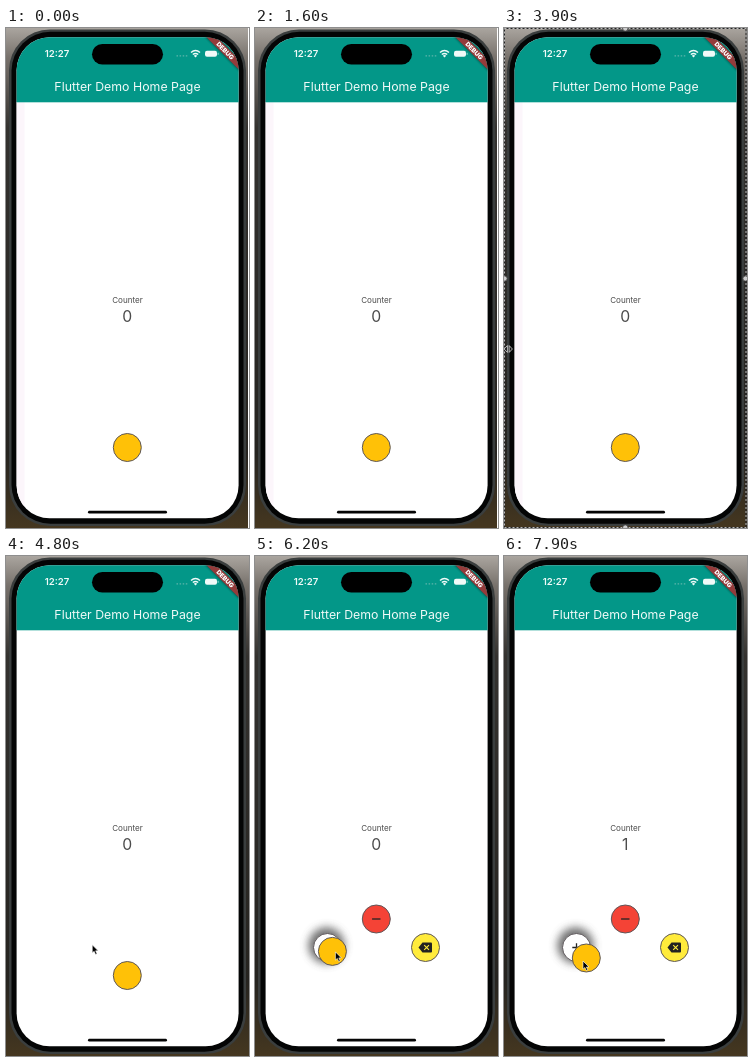
Animation, 243 px wide and 500 px high, one loop 8000 ms. Source, as an HTML page:

```html
<!DOCTYPE html>
<html lang="en">
<head>
<meta charset="utf-8">
<title>Counter demo</title>
<style>
  html, body { margin: 0; width: 100%; height: 100%; overflow: hidden; background: #2b2721; }
  svg { display: block; width: 243px; height: 500px; font-family: Inter, Roboto, sans-serif; }
  .btn circle { stroke: #5d575a; stroke-width: 1; }
  .icon { fill: none; stroke: #222; stroke-width: 1.3; }
</style>
</head>
<body>
<svg viewBox="0 0 243 500">
  <defs>
    <linearGradient id="wall" x2="0" y2="1">
      <stop offset="0" stop-color="#aaa59f"/>
      <stop offset=".06" stop-color="#77716b"/>
      <stop offset=".2" stop-color="#34322f"/>
      <stop offset=".85" stop-color="#262420"/>
      <stop offset="1" stop-color="#453720"/>
    </linearGradient>
    <clipPath id="screen"><rect x="10.6" y="9.3" width="222" height="481" rx="33"/></clipPath>
    <filter id="blur" x="-50%" y="-50%" width="200%" height="200%"><feGaussianBlur stdDeviation="4"/></filter>
    <filter id="soft" x="-20%" y="-100%" width="140%" height="300%"><feGaussianBlur stdDeviation="1.2"/></filter>
  </defs>

  <rect width="243" height="500" fill="url(#wall)"/>
  <rect x="3" y="1.5" width="237" height="496.5" rx="41" fill="#3a3e3e"/>
  <rect x="5.5" y="3.8" width="232" height="492" rx="39" fill="#040505"/>

  <g clip-path="url(#screen)">
    <rect x="10" y="9" width="223" height="483" fill="#fff"/>
    <rect id="tint" x="10" y="74" width="8.5" height="418" fill="#fcf6fb"/>
    <rect x="10" y="9" width="223" height="65.3" fill="#039788"/>
    <g transform="translate(219.2 22.8) rotate(45)">
      <rect x="-40" y="-4" width="80" height="8" fill="#000" opacity=".5" filter="url(#soft)"/>
      <rect x="-40" y="-3.7" width="80" height="7.4" fill="#943b3b"/>
      <text y="2.2" font-size="6.3" font-weight="900" text-anchor="middle" fill="#fff">DEBUG</text>
    </g>
  </g>

  <rect x="86" y="16" width="71" height="20.6" rx="10.3" fill="#000"/>
  <g fill="#f0faf8">
    <text x="51" y="29.3" font-size="9.6" font-weight="600" text-anchor="middle">12:27</text>
    <path d="M170.5 27.8h11" stroke="#5fb5ab" stroke-width="1.3" stroke-dasharray="1.5 1.6"/>
    <path d="M185 24.6Q189.5 20.4 194 24.6M186.8 26.6Q189.5 24.2 192.2 26.6" fill="none" stroke="#f0faf8" stroke-width="1.4"/>
    <path d="M187.8 27.7Q189.5 26.4 191.2 27.7L189.5 29.6z"/>
    <rect x="199" y="22.8" width="12" height="6" rx="2"/>
    <rect x="211.6" y="24.8" width="1" height="2" opacity=".6"/>
    <text x="121.5" y="63" font-size="12.35" text-anchor="middle">Flutter Demo Home Page</text>
  </g>

  <g text-anchor="middle" fill="#4c4c4c">
    <text x="121.5" y="275" font-size="8.1">Counter</text>
    <text id="count" x="121.3" y="294.3" font-size="15.75">0</text>
  </g>
  <rect x="82" y="482.8" width="79" height="2.8" rx="1.4" fill="#050505"/>

  <g id="options">
    <circle id="glow" cx="71.5" cy="389.5" r="18" fill="#555" opacity=".85" filter="url(#blur)"/>
    <g class="btn" transform="translate(121.3 363)">
      <circle r="14" fill="#f44336"/>
      <path class="icon" d="M-4.2 0h8.4"/>
    </g>
    <g class="btn" transform="translate(72.5 391.5)">
      <circle r="14" fill="#fff"/>
      <path class="icon" d="M-4.2 0h8.4M0-4.2v8.4"/>
    </g>
    <g class="btn" transform="translate(170.5 391.5)">
      <circle r="14" fill="#ffeb3b"/>
      <path d="M-7 0L-3-5H5.5Q6.5-5 6.5-4V4Q6.5 5 5.5 5H-3z" fill="#222"/>
      <path d="M-1.3-2.4l4.8 4.8M3.5-2.4l-4.8 4.8" stroke="#ffeb3b" stroke-width="1.1"/>
    </g>
  </g>
  <g id="ball" class="btn"><circle r="14" fill="#ffc107"/></g>

  <path id="arrow" d="M0 0V8.2L1.9 6.5L3.3 9.6L4.8 8.9L3.4 6H6z" fill="#000" stroke="#fff" stroke-width=".6"/>

  <path id="edge" d="M242.5 0v500" stroke="#fff"/>
  <g id="selection">
    <rect x=".5" y=".5" width="241.5" height="499" fill="none" stroke="#222"/>
    <rect x=".5" y=".5" width="241.5" height="499" fill="none" stroke="#bbb" stroke-dasharray="2 2"/>
    <g fill="#ccc" stroke="#444" stroke-width=".8">
      <circle cx="121.3" cy=".5" r="2.6"/>
      <circle cx="121.3" cy="499.5" r="2.6"/>
      <circle cx=".5" cy="250.5" r="2.6"/>
      <circle cx="241.5" cy="250.5" r="2.6"/>
    </g>
    <path d="M.2 321l3.2-3.4v6.8zM8.4 321l-3.2-3.4v6.8z" fill="#111" stroke="#ddd" stroke-width=".8"/>
  </g>
</svg>
<script>
  const LOOP = 8000;
  const HOME = [121.3, 419.5];
  const $ = id => document.getElementById(id);

  // Each key is [time, x, y].
  const pointer = [
    [4300, 4, 321], [5100, 124, 420], [5700, 124, 420], [6300, 77, 394],
    [6700, 77, 394], [6900, 81, 394], [7250, 118, 422.5], [7450, 118, 422.5], [7900, 79, 405], [8000, 77, 401]
  ];
  const drags = [
    { from: 5250, to: 6500, grip: [3, 0.5] },
    { from: 7350, to: 8000, grip: [-3.3, 3] }
  ];

  function along(keys, t) {
    const i = keys.findIndex(k => k[0] > t);
    if (i < 1) return keys.at(i).slice(1);
    const [a, b] = [keys[i - 1], keys[i]];
    const p = (t - a[0]) / (b[0] - a[0]);
    const e = p * p * (3 - 2 * p);
    return [1, 2].map(n => a[n] + (b[n] - a[n]) * e);
  }

  const show = (id, on) => $(id).setAttribute('visibility', on ? 'inherit' : 'hidden');
  const place = (id, [x, y]) => $(id).setAttribute('transform', `translate(${x} ${y})`);

  function draw(now) {
    const t = now % LOOP;
    const tip = along(pointer, t);
    const drag = drags.find(d => t >= d.from && t < d.to);
    const ball = drag ? tip.map((v, i) => v - drag.grip[i]) : HOME;

    place('arrow', tip);
    place('ball', ball);
    show('arrow', t >= 4300);
    show('edge', t < 3900);
    show('selection', t >= 3900 && t < 4300);
    show('tint', t < 4700);
    show('options', drag);
    show('glow', Math.hypot(ball[0] - 72.5, ball[1] - 391.5) < 24);
    $('options').setAttribute('opacity', drag ? Math.min(1, (t - drag.from) / 150) : 0);
    $('count').textContent = t < 6500 ? 0 : 1;
    requestAnimationFrame(draw);
  }
  requestAnimationFrame(draw);
</script>
</body>
</html>
```
